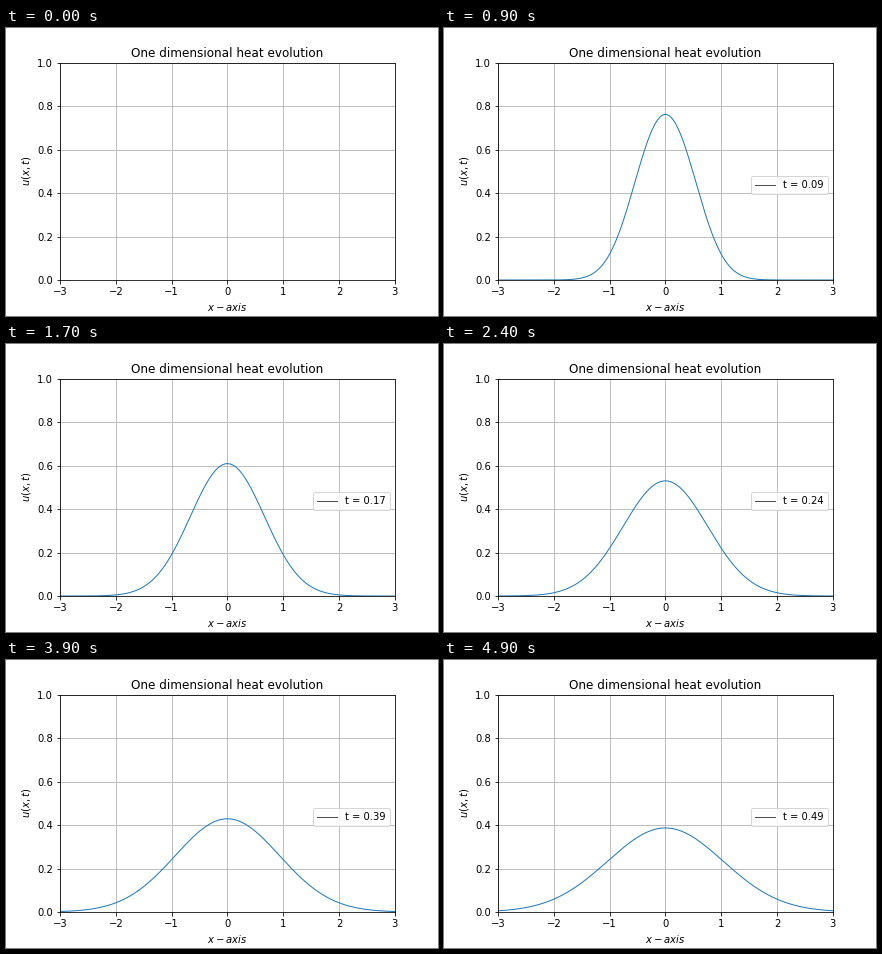
A matplotlib script that plays this animation: 432 px wide and 288 px high, repeating every 5 s.

```python
import math

import numpy as np
import matplotlib.pyplot as plt
from matplotlib.animation import FuncAnimation
from matplotlib.lines import Line2D

FRAMES = 50
INTERVAL = 100  # ms
HALF_WIDTH = 0.5  # initial state: unit box on [-0.5, 0.5]

plt.rcParams["font.family"] = "DejaVu Sans"
erf = np.vectorize(math.erf)
x = np.linspace(-3, 3, 601)


def heat(x, t):
    """Exact solution of u_t = u_xx for the box initial state."""
    spread = 2 * math.sqrt(t)
    return 0.5 * (erf((x + HALF_WIDTH) / spread) - erf((x - HALF_WIDTH) / spread))


fig, ax = plt.subplots(figsize=(6, 4), dpi=72, facecolor="white")
fig.subplots_adjust(left=0.125, right=0.9, bottom=0.125, top=0.88)
ax.set(xlim=(-3, 3), ylim=(0, 1), xlabel="$x-axis$", ylabel="$u(x,t)$",
       title="One dimensional heat evolution")
ax.grid(True)

curve, = ax.plot([], [], color="C0", lw=1)
handle = Line2D([], [], color="0.3", lw=1)


def update(frame):
    legend = ax.get_legend()
    if legend:
        legend.remove()
    if frame == 0:
        curve.set_data([], [])
        return curve,
    t = frame / 100
    curve.set_data(x, heat(x, t))
    ax.legend([handle], [f"t = {t}"], loc="upper right", bbox_to_anchor=(1, 0.5))
    return curve,


anim = FuncAnimation(fig, update, frames=FRAMES, interval=INTERVAL,
                     init_func=lambda: update(0), repeat=True, repeat_delay=0)
plt.show()
```
